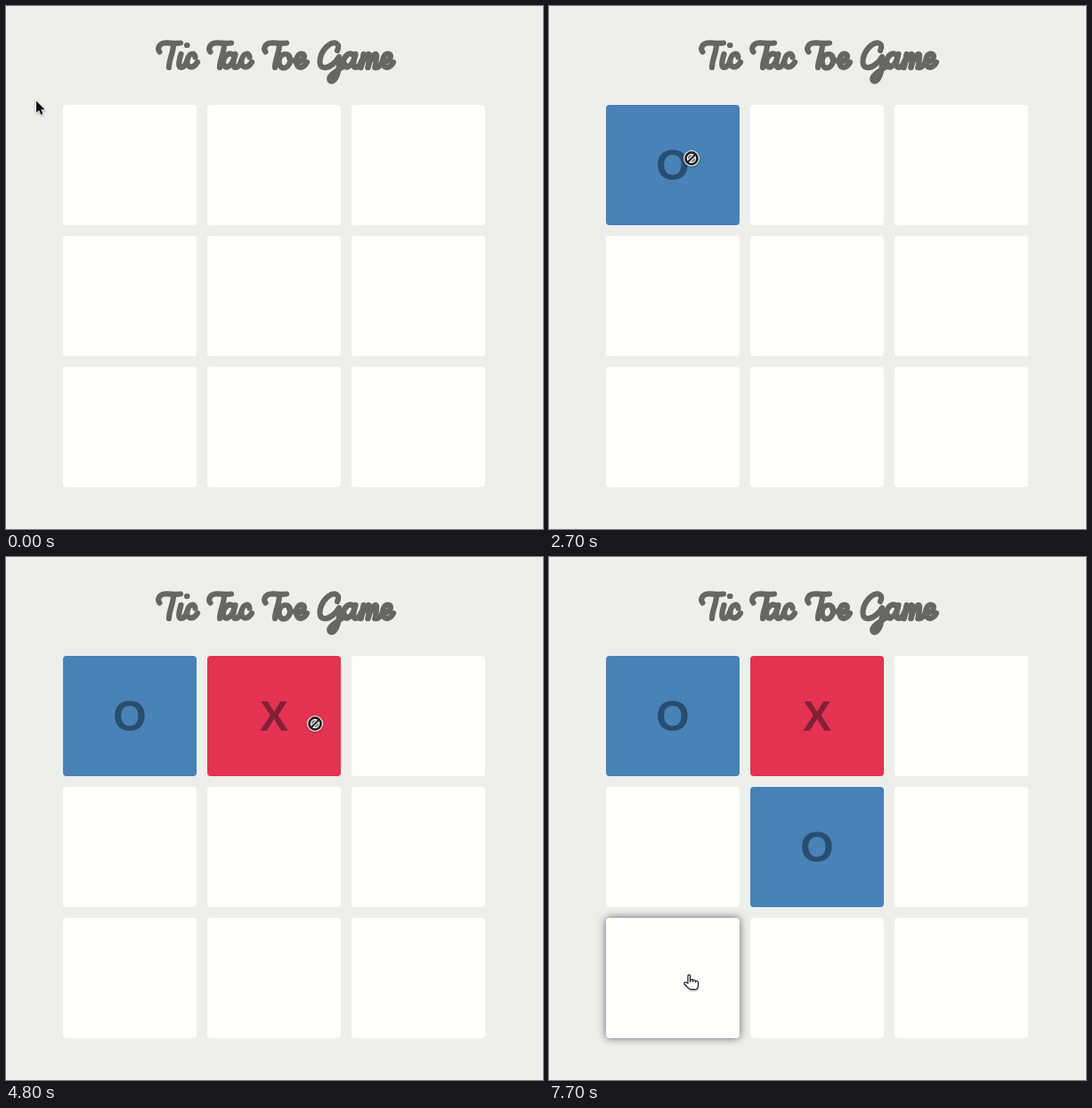
Animation, 603 px wide and 587 px high, one loop 8000 ms. Source, as an HTML page:

```html
<!DOCTYPE html>
<html lang="en">
<head>
<meta charset="utf-8">
<title>Tic Tac Toe Game</title>
<style>
  html, body { margin: 0; width: 100%; height: 100%; overflow: hidden; background: #eeeeed; }
  svg { display: block; width: 100%; height: 100%; }
  .script { fill: none; stroke: #666664; stroke-width: 6.2; stroke-linecap: round; stroke-linejoin: round; }
  .cell { fill: #fffffe; }
  .cell.hover { filter: drop-shadow(0 0 5px rgba(0, 0, 0, .6)); }
  .cell.O { fill: #4882b7; }
  .cell.X { fill: #e43353; }
  .mark { font: bold 48px "Liberation Sans", Arial, sans-serif; text-anchor: middle; }
  .mark.O { fill: #284d6f; }
  .mark.X { fill: #831f38; }
  #pointer { filter: drop-shadow(0 1px 1px rgba(0, 0, 0, .3)); }
</style>
</head>
<body>
<svg viewBox="0 0 603 587">
  <defs>
    <path id="T" d="M4.500 51.500C1.500 48 4 42 10 41.500S20 42.500 28 41.500M20 43C20 53 15 60 15 69"/>
    <path id="tail" d="M2.500 54C0 62 -1 69 2.500 69S8 65 9 62"/>
    <g id="a">
      <path d="M14 56C9 50 2.500 56 2 63C2 72 11 70 14.500 57"/>
      <use href="#tail" x="13"/>
    </g>
    <path id="c" d="M10.500 57.500C10 51 3 53 1.500 61C.5 70 8 71 13 63"/>
    <path id="e" d="M2 63C9 62 12 56 8.500 54C3 51.500 0 60 1.500 65C3.500 71 10 69.500 13 63"/>
    <path id="hump" d="M.5 69C3 59 9 51 10 55C10.500 59 9 64 8.500 69"/>
  </defs>
  <g class="script" role="img" aria-label="Tic Tac Toe Game">
    <use href="#T" x="168"/>
    <use href="#tail" x="194"/>
    <path d="M203 44h.5"/>
    <use href="#c" x="202"/>
    <use href="#T" x="225"/>
    <use href="#a" x="242"/>
    <use href="#c" x="263"/>
    <use href="#T" x="287"/>
    <path d="M314 54C304 54 305 70 312 69.500C320 69 322 54 314 54M318 58C320 62 323 62 326 60"/>
    <use href="#e" x="325"/>
    <path d="M372 50C376 42 369 39 362 44C352 52 349 68 357 69C364 70 371 62 374 57C375 66 373 78 369 82.500C365 87 361 83 365 78C368 74 375 71 381 66"/>
    <use href="#a" x="377"/>
    <path d="M401.500 54L398.500 69M414.500 69C418 70 421 66 423 62"/>
    <use href="#hump" x="398"/>
    <use href="#hump" x="406"/>
    <use href="#e" x="422"/>
  </g>
  <g id="board"></g>
  <g id="pointer">
    <path id="arrow" transform="translate(1 1.500) scale(.88)" d="M0 0V15L3.500 12L6 17.500L8.500 16.400L6.200 11H11Z" fill="#111" stroke="#fff" stroke-width="1.600" paint-order="stroke"/>
    <path id="hand" transform="translate(-5 -6)" fill="#fff" stroke="#1a1a1a" stroke-width="1.150" stroke-linejoin="round"
      d="M5 10.500V2C5 .5 7.500 .5 7.500 2V6.800C9 6 10.500 6.200 10.700 7.200C12 6.600 13.300 7 13.600 8C15 7.500 16.500 8 16.500 9.500V13C16.500 16 15 17.300 13.500 17.300H8C6 17.300 4.500 14.500 1.200 11.500C.2 9.800 1.500 8.800 3 9.500ZM7.500 6.800V9M10.600 7.200V9M13.600 8V9.500"/>
    <g id="blocked">
      <circle r="9" fill="#fff"/>
      <circle r="7.900" fill="#222"/>
      <circle r="4.600" fill="#777" stroke="#fff" stroke-width="1.100"/>
      <path d="M-3 3L3 -3" stroke="#fff" stroke-width="4"/>
      <path d="M-4 4L4 -4" stroke="#222" stroke-width="2.200"/>
    </g>
  </g>
</svg>
<script>
const LOOP = 8000, STEP = 100, W = 150, H = 135;
const NS = "http://www.w3.org/2000/svg";
const board = document.getElementById("board");
const pointer = document.getElementById("pointer");

// The pointer rests between glides; each glide ends at (x, y).
const glides = [
  { from: 0, to: 0, x: 33, y: 105 },
  { from: 800, to: 900, x: 43, y: 105 },
  { from: 1000, to: 1400, x: 108, y: 160 },
  { from: 1500, to: 1700, x: 122, y: 176 },
  { from: 2300, to: 2700, x: 160, y: 171 },
  { from: 2700, to: 2900, x: 165, y: 158 },
  { from: 3100, to: 3600, x: 226, y: 245.5 },
  { from: 3600, to: 4000, x: 336, y: 202 },
  { from: 4000, to: 4300, x: 347, y: 187 },
  { from: 4800, to: 4900, x: 345, y: 215 },
  { from: 5000, to: 5700, x: 315, y: 328 },
  { from: 6700, to: 7300, x: 213, y: 400 },
  { from: 7300, to: 7700, x: 156, y: 474 }
];
const moves = [
  { at: 2000, cell: 0, mark: "O" },
  { at: 4800, cell: 1, mark: "X" },
  { at: 6400, cell: 4, mark: "O" }
];

function add(tag, attrs) {
  const el = document.createElementNS(NS, tag);
  for (const key in attrs) el.setAttribute(key, attrs[key]);
  return board.appendChild(el);
}

const cells = Array.from({ length: 9 }, (_, i) => {
  const x = 64 + (i % 3) * 162, y = 111 + Math.floor(i / 3) * 147;
  return {
    x, y,
    rect: add("rect", { x, y, width: W, height: H, rx: 4 }),
    label: add("text", { x: x + W / 2, y: y + 84 })
  };
});

function pointerAt(t) {
  const now = Math.floor(t / STEP) * STEP;
  let { x, y } = glides[0];
  for (const glide of glides.slice(1)) {
    if (now <= glide.from) break;
    const k = Math.min(1, (now - glide.from) / (glide.to - glide.from));
    x += (glide.x - x) * k;
    y += (glide.y - y) * k;
  }
  return [x, y];
}

function draw(t) {
  const [px, py] = pointerAt(t);
  let cursor = "arrow";
  cells.forEach((cell, i) => {
    const move = moves.find(m => m.cell === i && m.at <= t);
    const mark = move ? move.mark : "";
    const over = px >= cell.x && px < cell.x + W && py >= cell.y && py < cell.y + H;
    if (over) cursor = mark ? "blocked" : "hand";
    cell.rect.setAttribute("class", "cell " + (mark || (over ? "hover" : "")));
    cell.label.setAttribute("class", "mark " + mark);
    cell.label.textContent = mark;
  });
  pointer.setAttribute("transform", `translate(${px} ${py})`);
  for (const shape of pointer.children) {
    shape.style.display = shape.id === cursor ? "" : "none";
  }
}

const begin = performance.now();
function tick() {
  draw((performance.now() - begin) % LOOP);
  requestAnimationFrame(tick);
}
tick();
</script>
</body>
</html>
```
